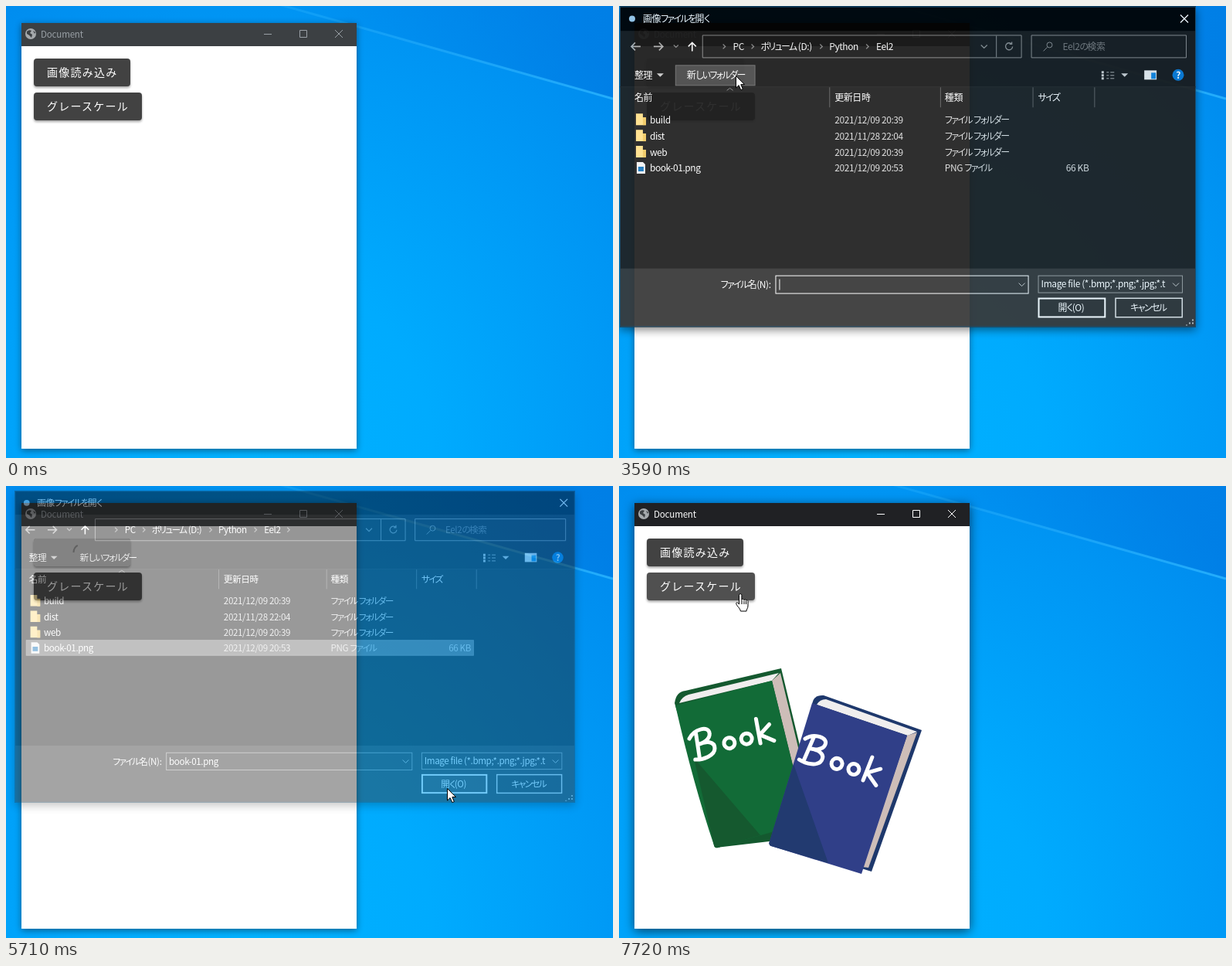
These frames come from a looping animation (786x585 px, 8 s). An HTML page:

```html
<!DOCTYPE html>
<html lang="ja">
<head>
<meta charset="utf-8">
<style>
html, body { margin: 0; width: 100%; height: 100%; overflow: hidden; background: #00a2fa }
svg { display: block; width: 786px; height: 585px }
text { font: 12px "Noto Sans CJK JP", "Noto Sans CJK", "Open Sans", sans-serif; letter-spacing: -.4px; fill: #fff; white-space: pre }
.k { letter-spacing: -1.6px; font-feature-settings: "palt" }
.label { font-size: 14px; font-weight: 500; letter-spacing: 1.25px }
.btn { filter: drop-shadow(0 2px 1.5px rgba(0,0,0,.35)) }
.line { fill: none; stroke: #fff }
.dim { stroke: #8a8a8a }
#frame { filter: drop-shadow(0 2px 4px rgba(0,0,0,.45)) }
.active #frame { filter: drop-shadow(0 3px 7px rgba(0,0,0,.6)) }
#bar { fill: #3c4043 }
.active #bar { fill: #202124 }
#title { font-size: 11.5px; letter-spacing: -.15px; fill: #9aa0a6 }
.active #title { fill: #fff }
#controls { fill: none; stroke: #9aa0a6 }
.active #controls { stroke: #fff }
#dialog { transform-origin: 374px 208px }
#panel { filter: drop-shadow(0 4px 6px rgba(0,0,0,.5)) }
</style>
</head>
<body>
<svg viewBox="0 0 786 585">
  <defs>
    <radialGradient id="sky" gradientUnits="userSpaceOnUse" cx="0" cy="0" r="1" gradientTransform="translate(330 590) scale(640 720)">
      <stop offset="0" stop-color="#00b2ff"/><stop offset=".35" stop-color="#00abfe"/>
      <stop offset=".7" stop-color="#009af6"/><stop offset="1" stop-color="#008bee"/>
    </radialGradient>
    <linearGradient id="shade"><stop offset="0" stop-color="#0070dc" stop-opacity="0"/><stop offset="1" stop-color="#0070dc" stop-opacity=".45"/></linearGradient>
    <linearGradient id="beam"><stop offset="0" stop-color="#2ab4ff" stop-opacity=".3"/><stop offset="1" stop-color="#2ab4ff" stop-opacity=".85"/></linearGradient>
    <clipPath id="clip"><rect x="36" y="68" width="125" height="36" rx="4"/></clipPath>
    <g id="word" fill="none" stroke="#fff" stroke-width="5" stroke-linecap="round" stroke-linejoin="round">
      <path d="M9-34L6-2M-1-29C8-40 28-40 26-29C25-22 15-19 9-19C20-21 30-18 28-9C26 0 10 2 0-1M89-33L87-1M104-22L89-12L105 0"/>
      <circle cx="48" cy="-11" r="7"/><circle cx="71" cy="-11" r="7"/>
    </g>
  </defs>

  <rect width="786" height="585" fill="url(#sky)"/>
  <path d="M350 0H786V120Z" fill="url(#shade)"/>
  <path d="M350-3L786 120" stroke="url(#beam)" stroke-width="3"/>

  <g id="win">
    <rect id="frame" x="20" y="22" width="434" height="551" fill="#fff"/>
    <rect id="bar" x="20" y="22" width="434" height="30"/>
    <circle cx="32" cy="36" r="7" fill="#a5a9ac"/>
    <path d="M27 33q3-3 6-1l-2 3 3 2-1 4q-3-4-6-5zM35 32l3 2-1 2z" fill="#3c4043"/>
    <text id="title" x="45" y="41">Document</text>
    <path id="controls" d="M334 36.5h10M380.5 31.5h9v9h-9zM426 31l10 10M436 31l-10 10"/>
    <g id="books">
      <path d="M72 281Q74 266 86 265L210 236L262 452L126 468Z" fill="#14592f"/>
      <path d="M78 281Q81 273 90 270L207 242L198 252Z" fill="#f0eeee"/>
      <path d="M198 252L209 242L236 355L226 365Z" fill="#cdbdb8"/>
      <path d="M73 284L198 252L243 435L128 468Q124 469 123 465Q96 385 73 284Z" fill="#126b37"/>
      <path d="M97 352L183 452L128 468Q124 469 123 465Z" fill="#15592f"/>
      <use href="#word" transform="translate(99 355) rotate(-14)"/>
      <path d="M250 285Q250 270 265 271L392 316L327 499L314 495Z" fill="#1e386c"/>
      <path d="M256 283Q260 276 268 276L386 318L374 323Z" fill="#f0eeee"/>
      <path d="M373 323L386 319L323 494L315 493Z" fill="#cdbdb8"/>
      <path d="M250 281L373 323L314 502L197 466Q193 464 195 460Z" fill="#303f88"/>
      <path d="M226 360L271 488L197 466Q193 464 195 460Z" fill="#223a70"/>
      <use href="#word" transform="translate(233 355) rotate(18)"/>
    </g>
    <rect class="btn" x="36" y="68" width="125" height="36" rx="4" fill="#424242"/>
    <text class="label" x="53" y="91.3">画像読み込み</text>
    <g id="loading">
      <rect x="36" y="68" width="125" height="36" rx="4" fill="#fff"/>
      <rect x="36" y="68" width="125" height="36" rx="4" fill="#dbdbdb"/>
      <circle id="spin" cx="98" cy="86" r="10.5" class="line" style="stroke:#9b9b9b" stroke-width="2" pathLength="360"/>
    </g>
    <g clip-path="url(#clip)"><circle id="ripple" cx="151" cy="95"/></g>
    <rect id="gray" class="btn" x="36" y="112" width="140" height="36" rx="4"/>
    <text class="label" x="53" y="135.3">グレースケール</text>
  </g>

  <g id="dialog">
    <rect id="panel" width="748" height="416" fill="#202020"/>
    <path d="M0 0H748V32H0z"/>
    <path d="M0 32H748V105H0z" fill="#191919"/>
    <path d="M0 340H748V416H0z" fill="#383838"/>
    <rect x=".5" y=".5" width="747" height="415" class="line" style="stroke:#1c4a68"/>
    <circle cx="16" cy="16" r="4" fill="#9cc8e6"/>
    <path class="line" d="M728 11l10 10M738 11l-10 10" stroke-width="1.3"/>
    <g class="line" stroke-width="1.6">
      <path class="dim" style="stroke:#b0b0b0" d="M27 52H15m5-5l-5 5 5 5M44 52H56m-5-5l5 5-5 5"/>
      <path d="M94 58V47m-5 5l5-5 5 5"/>
      <path class="dim" stroke-width="1.3" d="M70 50l3 3 3-3M469 50l4 4 4-4M134 49l3 3-3 3M171 49l3 3-3 3M260 49l3 3-3 3M320 49l3 3-3 3M509 49a4.5 4.5 0 1 0 1 3M509 46v3h-3"/>
      <path id="crumb" class="dim" stroke-width="1.3" d="M364 49l3 3-3 3"/>
      <path class="dim" stroke-width="1" d="M107.5 37.5H521.5V66.5H107.5zM534.5 37.5H735.5V66.5H534.5zM489 38v28M555 53l-5 5M139 109l4-3 4 3"/>
      <circle class="dim" cx="558" cy="50" r="3.5" stroke-width="1"/>
    </g>
    <rect id="newHover" x="72.5" y="76.5" width="103" height="26" fill="#4a4a4a" stroke="#707070"/>
    <path d="M48 87h9l-4.500 4.500zM651 87h9l-4.500 4.500z" fill="#ccc"/>
    <path d="M627 84v11" stroke="#ccc" stroke-width="3" stroke-dasharray="3 1"/>
    <path d="M632 85.500h3m2 0h5M632 89.500h3m2 0h5M632 93.500h3m2 0h5" stroke="#aaa"/>
    <path d="M681 83h16v12h-16z" fill="#e8e8e8"/><path d="M690 86h6v8h-6z" fill="#1683d8"/>
    <circle cx="725" cy="89" r="7.500" fill="#0b78d0"/>
    <text x="722.300" y="93.500" style="font-weight:700">?</text>
    <path d="M0 104.500H748" stroke="#2b2b2b"/>
    <path d="M272.500 105v26M416.500 105v26M536.500 105v26M616.500 105v26" stroke="#626262"/>
    <rect id="row" x="15.500" y="199.500" width="597" height="20"/>
    <g id="labels"></g>
    <rect id="field" x="202.500" y="349.500" width="328" height="23" fill="#383838"/>
    <path id="caret" d="M207.500 354v14" stroke="#fff"/>
    <rect x="543.500" y="349.500" width="187" height="22" fill="#383838" stroke="#9b9b9b"/>
    <path class="line dim" style="stroke:#ccc" d="M518 359l4 4 4-4M718 359l4 4 4-4"/>
    <rect id="open" x="544" y="379" width="86" height="24" stroke="#fff" stroke-width="2"/>
    <rect x="643.750" y="378.750" width="86.500" height="24.500" fill="#333" stroke="#e4e4e4" stroke-width="1.500"/>
    <g id="fields"></g>
    <path d="M744 406v8M740 410v4M736 413v1" stroke="#bbb" stroke-width="2" stroke-dasharray="2 2"/>
  </g>

  <g id="cursor" fill="#fff" stroke="#000" stroke-linejoin="round">
    <path id="arrow" d="M.5.5V16l3.600-3.400 2.700 6 2.600-1.100-2.600-5.900H11.500z"/>
    <path id="hand" d="M4.500 2.300a1.700 1.700 0 0 1 3.400 0V8.500c0-1.600 3-1.600 3 .3.300-1.500 2.700-1 2.700.6.400-1.200 2.400-.8 2.400.9V16c0 4-2 4-2 7H6.500C6 19 1 16 .7 13.300c-.2-1.600 1.800-2 2.800-.6l1 1.400zM8 9v5M11 9.500v4.500M13.600 10v4"/>
  </g>
</svg>
<script>
const $ = id => document.getElementById(id);
const set = (id, attrs) => { for (const k in attrs) $(id).setAttribute(k, attrs[k]); };
const show = (id, on) => { $(id).style.display = on ? '' : 'none'; };

// Kana runs are set tighter than Latin and kanji.
const label = (x, mid, s, extra = '') =>
  `<text x="${x}" y="${mid + 4.5}" ${extra}>${s.replace(/[ぁ-ヶー]+/g, '<tspan class="k">$&</tspan>')}</text>`;

const files = [
  ['build', '2021/12/09 20:39'],
  ['dist', '2021/11/28 22:04'],
  ['web', '2021/12/09 20:39'],
  ['book-01.png', '2021/12/09 20:53', 'PNG ファイル', '66 KB']
];

$('labels').innerHTML = [
  [30, 16, '画像ファイルを開く'], [147, 52, 'PC'], [183, 52, 'ボリューム (D:)'],
  [272, 52, 'Python'], [333, 52, 'Eel2'], [575, 52, 'Eel2の検索', 'style="fill:#777"'],
  [19, 89, '整理'], [87, 89, '新しいフォルダー'],
  [19, 118, '名前'], [279, 118, '更新日時'], [422, 118, '種類'], [543, 118, 'サイズ']
].map(a => label(...a)).join('') + files.map(([name, date, kind = 'ファイル フォルダー', size], i) => {
  const y = 147 + 21 * i, soft = 'style="fill:#dedede"';
  const icon = size
    ? `<path d="M22 ${y - 8}h8l3 3v12H22z" fill="#f4f4f4"/><path d="M24 ${y - 2}h7v6h-7z" fill="#1877bd"/>`
    : `<path d="M21 ${y - 8}h9v5h4v10H21z" fill="#ffe08a"/><path d="M30 ${y - 3}h4v10h-4z" fill="#f3ca62"/>`;
  return icon + label(39, y, name) + label(279, y, date, soft) + label(422, y, kind, soft) +
    (size ? label(609, y, size, 'text-anchor="end" style="fill:#dedede"') : '');
}).join('');

$('fields').innerHTML = [
  [131, 361, 'ファイル名(N):'], [206, 361, 'book-01.png', 'id="chosen"'],
  [547, 360, 'Image file (*.bmp;*.png;*.jpg;*.t'],
  [569, 391, '開く(O)'], [663, 391, 'キャンセル']
].map(a => label(...a)).join('');

// Each key holds until the next: time, then values.
const at = (keys, t) => keys.filter(k => k[0] <= t).pop().slice(1);
const path = [
  [0, 900, 300], [1190, 774, 212], [1320, 640, 160], [1450, 503, 122], [1590, 380, 108],
  [1720, 241, 91], [1860, 38, 88, 1], [1990, 147, 88, 1], [2130, 241, 91], [2270, 250, 110],
  [2400, 262, 124], [2650, 200, 95], [2790, 180, 91], [2920, 150, 90, 1], [3050, 146, 90, 1],
  [3330, 151, 90], [3850, 190, 180], [3980, 239, 261], [4110, 248, 266], [4250, 245, 225],
  [4380, 240, 208], [4650, 236, 200], [4780, 240, 194], [4910, 330, 225], [5040, 515, 296],
  [5180, 545, 326], [5320, 565, 350], [5450, 571, 380], [5570, 571, 391], [6650, 444, 260],
  [6790, 367, 229], [6910, 343, 219], [7050, 331, 206], [7190, 260, 170], [7320, 190, 145],
  [7450, 150, 143, 1], [7590, 150, 141, 1], [7720, 151, 139, 1]
];
const fade = [[0, 0, 1], [3590, .93, .9973], [3720, 1, 1], [5710, .45, .97], [5850, .01, .96], [5980, 0, 1]];
const load = [[0, 0], [3330, 1], [6120, .5], [6250, .15], [6380, 0]];
const arcs = [[0, 5, 8], [3460, -20, 50], [5710, 180, 60], [5850, 227, 88], [5980, 290, 140]];
const ripples = [[0, 0, 0], [3200, 45, .2], [3330, 101, .09], [3460, 125, .06], [3590, 0, 0]];

function draw(now) {
  const t = now % 8000;
  const within = (a, b) => t >= a && t < b;

  const [x, y, hand] = at(path, t);
  set('cursor', { transform: `translate(${x} ${y})` });
  show('hand', hand);
  show('arrow', !hand);

  set('win', { class: within(2400, 3460) || t >= 6910 ? 'active' : '' });
  set('loading', { opacity: at(load, t)[0] });
  const [start, len] = at(arcs, t);
  set('spin', { 'stroke-dasharray': `${len} 360`, transform: `rotate(${start} 98 86)` });
  const [r, ink] = at(ripples, t);
  set('ripple', { r, 'fill-opacity': ink, fill: t < 3330 ? '#fff' : '#000' });
  set('gray', { fill: t >= 7450 ? '#505050' : '#424242' });
  show('books', t >= 6120);

  const [alpha, scale] = at(fade, t);
  show('dialog', alpha);
  $('dialog').style.opacity = alpha;
  $('dialog').style.transform = `scale(${scale})`;
  const picked = t >= 4510;
  show('newHover', t < 3850);
  show('crumb', t >= 3720);
  show('caret', !picked);
  show('chosen', picked);
  show('row', t >= 4380);
  set('row', { fill: picked ? '#777' : '#4d4d4d', stroke: picked ? '#8a8a8a' : '#4d4d4d' });
  set('field', { stroke: picked ? '#9b9b9b' : '#fff' });
  set('open', { fill: t >= 5450 ? '#454545' : '#333' });
  requestAnimationFrame(tick);
}
const began = performance.now();
const tick = () => draw(performance.now() - began);
tick();
</script>
</body>
</html>
```
